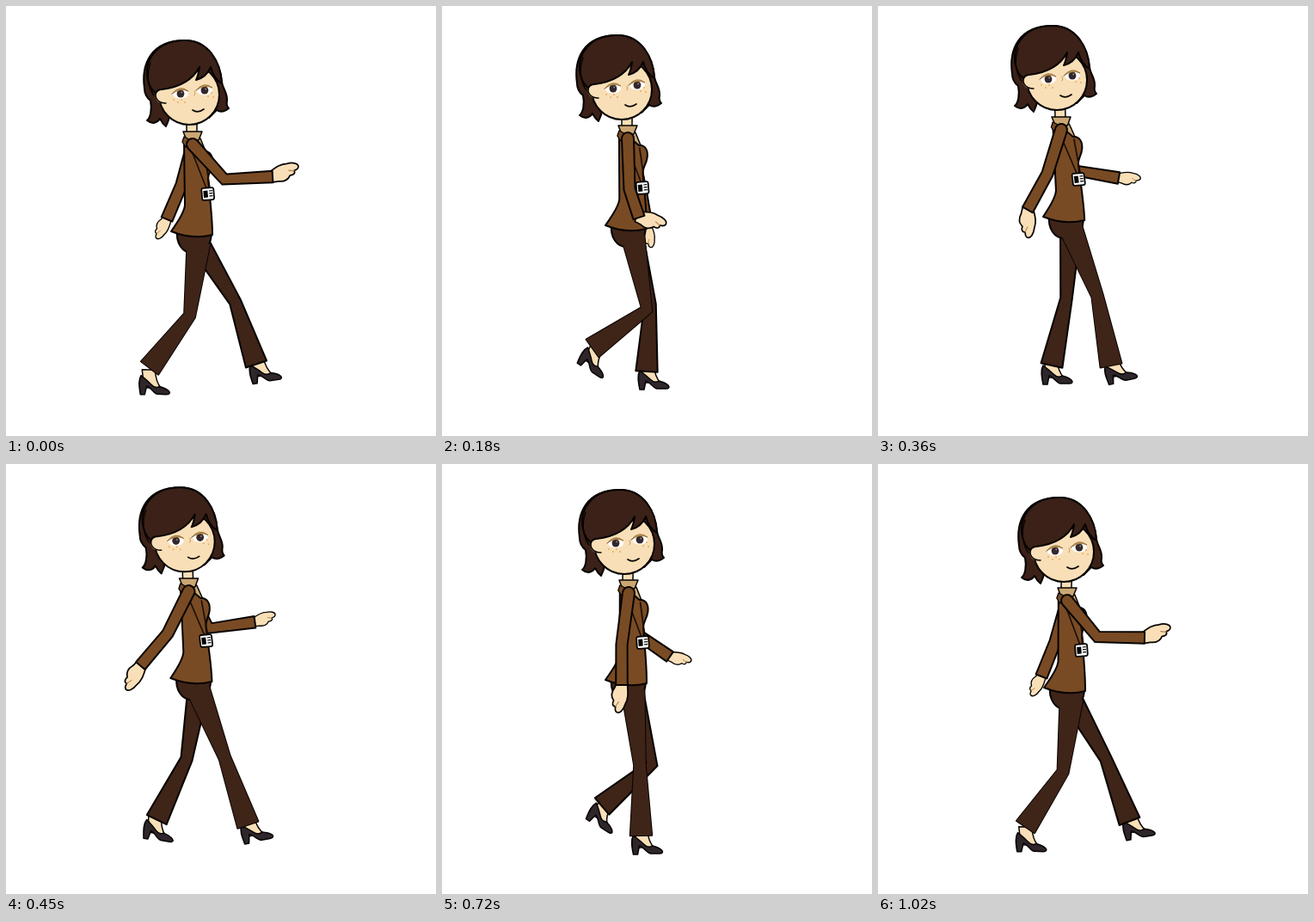
Write an HTML page with a canvas that moves like this. It is 500 px wide and 500 px high and loops after 1050 ms.

```html
<!DOCTYPE html>
<html lang="en">
<head>
<meta charset="utf-8">
<title>Walk cycle</title>
<style>
  html, body { margin: 0; width: 100%; height: 100%; overflow: hidden; background: #fff; }
  canvas { display: block; width: 500px; height: 500px; }
</style>
</head>
<body>
<canvas id="stage" width="500" height="500"></canvas>
<script>
const ctx = document.getElementById('stage').getContext('2d');
const LOOP = 1050, STEP = 30;
const TIMES = [0, 180, 360, 570, 720, 870, 1020];
const INK = '#060302', HAIR = '#3b2117', PANTS = '#3f2418', JACKET = '#794b24',
      SKIN = '#f9dfb7', TAN = '#cba774', SHOE = '#2e262b';

// Offsets from the rest pose: head x, head y, collar x, hem x, torso y
const BODY = [
  [0, 0, 0, 0, 0], [-4, -6, -1, -2, -7], [-5, -17, -4, 0, -17], [-5, -5, -4, -2, -6],
  [-1, -10, 0, -2, -11], [5, -11, 5, 1, -12], [3, -1, 3, 1, -2]
];
const HIP = [224, 275], SHOULDER = [217, 161];

// Legs: knee, cuff, foot offset from cuff, foot turn
const NEAR_LEG = [
  [213.5, 360, 167, 421, -1, 9, 2], [238, 353, 175, 398, 2, 4, 34],
  [255, 337, 271, 418, 2, -1, -12], [247.5, 351, 270.5, 430, 0, 0, 0],
  [230, 350, 231.5, 432, 0, 0, 0], [217, 349, 202, 430.5, 2, 0, 0],
  [215, 358, 171.5, 422, 0, 7, 2]
];
const FAR_LEG = [
  [266.5, 344, 291, 416.5, 2, 0, -8], [242, 347, 238, 425, 1, -1, 0],
  [219, 340, 202, 418, -1, 0, 0], [206.5, 350, 152, 404, -4, 3, 25],
  [244, 349, 186, 398, 1, 1, 33], [264, 336, 283, 412, -1, -1, -3],
  [265, 343, 292.5, 415.5, 2, -1, -9]
];
// Arms: elbow, cuff, hand turn
const NEAR_ARM = [
  [254, 201.5, 310, 198.5, -16], [218, 213, 229, 246, 20], [197, 195, 174, 237, 96],
  [181, 205, 149.5, 240, 152], [209, 210, 209, 257, 106], [242, 201, 283, 236, 36],
  [255, 201, 310, 202, -16]
];
const FAR_ARM = [
  [204, 208, 187, 248, 125], [230, 208, 238, 256, 85], [228, 191, 280, 200, 8],
  [246, 193, 297, 181, -25], [230, 200, 265, 224, 18], [218, 202, 214, 244, 100],
  [206, 207, 190, 247, 125]
];

const hipAt = b => [HIP[0] + b[3], HIP[1] + b[4]];
const shoulderAt = b => [SHOULDER[0] + b[2], SHOULDER[1] + b[4]];
const rad = d => d * Math.PI / 180;

// Joint points become angle and length, so limbs swing instead of shrinking
function toPolar(rows, root) {
  return rows.map((r, i) => {
    const [x, y] = root(BODY[i]), [kx, ky, ex, ey] = r;
    return [Math.atan2(ky - y, kx - x), Math.hypot(kx - x, ky - y),
            Math.atan2(ey - ky, ex - kx), Math.hypot(ex - kx, ey - ky), ...r.slice(4)];
  });
}
const nearLeg = toPolar(NEAR_LEG, hipAt), farLeg = toPolar(FAR_LEG, hipAt);
const nearArm = toPolar(NEAR_ARM, shoulderAt), farArm = toPolar(FAR_ARM, shoulderAt);

// Periodic cubic interpolation through the keys
function sample(rows, t) {
  const n = TIMES.length;
  const time = i => TIMES[(i + n) % n] + Math.floor(i / n) * LOOP;
  const row = i => rows[(i + n) % n];
  let i = n - 1;
  while (TIMES[i] > t) i--;
  const t0 = time(i), h = time(i + 1) - t0, u = (t - t0) / h;
  const u2 = u * u, u3 = u2 * u;
  return row(i).map((v, c) => {
    const w = row(i + 1)[c];
    const m0 = (w - row(i - 1)[c]) / (time(i + 1) - time(i - 1)) * h;
    const m1 = (row(i + 2)[c] - v) / (time(i + 2) - t0) * h;
    return (2 * u3 - 3 * u2 + 1) * v + (u3 - 2 * u2 + u) * m0
         + (3 * u2 - 2 * u3) * w + (u3 - u2) * m1;
  });
}

function chain([x, y], [a, l, b, m]) {
  const knee = [x + Math.cos(a) * l, y + Math.sin(a) * l];
  return { a, b, root: [x, y], mid: knee,
           end: [knee[0] + Math.cos(b) * m, knee[1] + Math.sin(b) * m] };
}

function limbPath({ a, b, root, mid, end }, w0, w1, w2, round) {
  const p = new Path2D();
  const side = ([x, y], ang, w) => [x - Math.sin(ang) * w, y + Math.cos(ang) * w];
  const bend = (a + b) / 2;
  p.moveTo(...side(root, a, w0));
  p.lineTo(...side(mid, bend, w1));
  p.lineTo(...side(end, b, w2));
  p.lineTo(...side(end, b, -w2));
  p.lineTo(...side(mid, bend, -w1));
  p.lineTo(...side(root, a, -w0));
  if (round) p.arc(...root, w0, a - Math.PI / 2, a + Math.PI / 2, true);
  p.closePath();
  return p;
}

function shape(d, fill, width = 2, ink = INK) {
  const p = typeof d === 'string' ? new Path2D(d) : d;
  if (fill) { ctx.fillStyle = fill; ctx.fill(p); }
  if (width) { ctx.lineWidth = width; ctx.strokeStyle = ink; ctx.stroke(p); }
}
const line = (d, width = 1.5, ink = INK) => shape(d, null, width, ink);

function dot(x, y, rx, ry, fill) {
  ctx.fillStyle = fill;
  ctx.beginPath();
  ctx.ellipse(x, y, rx, ry, 0, 0, 7);
  ctx.fill();
}

function placed(x, y, turn, draw, scale = 1) {
  ctx.save();
  ctx.translate(x, y);
  ctx.rotate(rad(turn));
  ctx.scale(scale, scale);
  draw();
  ctx.restore();
}

function foot() {
  shape('M-8 -7L7 -7C8 2 10 9 15 14L-5 14Z', SKIN, 1.5);
  shape('M-9 0C-12 5 -11 12 -9 22L-4 22L-2 12C3 13 6 20 11 21L21 21C25 21 26 19 24 17'
      + 'C21 14 17 13 13 12C10 14 6 13 3 10C-1 6 -5 3 -9 0Z', SHOE, 1.5);
}

function hand() {
  shape('M-3 -6C6 -9 12 -12 20 -10C27 -10 33 -7 32 -3C31 0 28 0 26 0C27 4 23 5 20 4'
      + 'C16 9 10 9 5 7L-3 6Z', SKIN, 1.7);
  line('M26 0C24 0 22 -1 20 -2', 1.2, '#b98a55');
}

function drawLeg(pose, hip, pelvis) {
  const c = chain(hip, pose);
  placed(c.end[0] + pose[4], c.end[1] + pose[5], pose[6], foot);
  const p = limbPath(c, pelvis ? 13.5 : 12, 6.8, 12.7);
  shape(p, PANTS);
  if (!pelvis) return;
  const sack = new Path2D();
  sack.addPath(new Path2D('M-25 -16C-27 2 -18 12 -8 12C8 13 16 2 15 -16Z'),
               new DOMMatrix([1, 0, 0, 1, ...hip]));
  shape(sack, PANTS);
  shape(p, PANTS, 0);
}

function drawArm(pose, shoulder, handScale) {
  const c = chain(shoulder, pose);
  const sleeve = limbPath(c, 7, 6.6, 6.8, true);
  placed(...c.end, pose[4], hand, handScale);
  shape(sleeve, JACKET);
}

function badge() {
  const card = new Path2D();
  card.roundRect(-7, -7, 14, 14, 2);
  shape(card, '#fff', 1.8);
  ctx.fillStyle = INK;
  ctx.fillRect(-5, -4, 5, 8);
  for (let y = -4; y < 5; y += 3) ctx.fillRect(1.5, y, 4, 1.2);
}

function drawTorso(b) {
  const lean = (b[2] - b[3]) / 116;
  ctx.save();
  ctx.transform(1, 0, -lean, 1, b[3] + lean * 262, b[4]);
  shape('M210 134L222 134L222 150L210 150Z', SKIN, 1.5);
  shape('M213 155L226 154L233 171L227 174Z', TAN, 1.5);
  shape('M207 156L215 156L230 169C238 168 241 176 240 183C239 191 235 194 235 201'
      + 'C237 224 240 245 240 266Q217 272 192 262C202 248 208 238 208 231Z', JACKET);
  shape('M206 146L228 146L224 156L210 156Z', TAN, 1.5);
  shape('M207 152L217 157L209 164L205 158Z', JACKET, 1.3);
  line('M213 161L233 212M231 172L237 212', 1.7, '#1d0f08');
  placed(234.7, 218.5, -5, badge);
  ctx.restore();
}

function eye(x, y) {
  dot(x, y, 9, 5.8, '#fff');
  dot(x, y, 4.4, 4.6, '#33272a');
  dot(x + 1.2, y - 1.4, 1, 1, '#8d8585');
  shape(`M${x - 10} ${y}Q${x - 1} ${y - 11} ${x + 9} ${y - 3}Q${x} ${y - 7} ${x - 10} ${y}Z`,
        '#c69a55', 0.8, '#8a642d');
}

function drawHead(x, y) {
  ctx.save();
  ctx.translate(x, y);
  shape('M161 96C157 68 168 40 208 40C236 40 249 66 251 88C252 96 258 102 257 110'
      + 'C256 115 258 118 259 119C254 123 249 124 245 121L236 130L190 129'
      + 'C189 134 187 137 186 140C182 137 180 133 179 131C176 136 170 138 164 133'
      + 'C168 130 170 120 168 110C163 106 161 101 161 96Z', HAIR);
  const face = new Path2D();
  face.arc(213, 103, 35, 0, 7);
  shape(face, SKIN);
  dot(182, 105, 8.5, 8, SKIN);
  line('M175 100C172 106 176 113 186 113');
  eye(203, 102);
  eye(231, 98);
  line('M219 99Q221 102 219 104', 1, '#c9985a');
  for (const [fx, fy] of [[195, 109], [200, 112], [204, 109], [208, 112], [235, 105], [239, 101], [241, 106]])
    dot(fx, fy, 1, 1, '#e9ac5e');
  line('M217 121Q223 125 230 120', 1.7);
  shape('M251 90C250 66 236 40 208 40C174 40 160 64 165 86C167 94 171 99 174 101'
      + 'C176 98 178 97 181 97C198 95 216 88 225 71C224 78 223 82 221 86'
      + 'C229 84 235 78 238 71C240 79 244 86 251 90Z', HAIR);
  line('M168 66C163 80 165 95 172 104', 1.3);
  ctx.restore();
}

const start = performance.now();

function draw() {
  const t = Math.floor((performance.now() - start) % LOOP / STEP) * STEP;
  const body = sample(BODY, t), hip = hipAt(body), shoulder = shoulderAt(body);
  ctx.fillStyle = '#fff';
  ctx.fillRect(0, 0, 500, 500);
  ctx.lineJoin = ctx.lineCap = 'round';
  drawArm(sample(farArm, t), shoulder, 0.78);
  drawLeg(sample(farLeg, t), hip, false);
  drawLeg(sample(nearLeg, t), hip, true);
  drawTorso(body);
  drawHead(body[0], body[1]);
  drawArm(sample(nearArm, t), shoulder, 1);
  requestAnimationFrame(draw);
}
draw();
</script>
</body>
</html>
```
